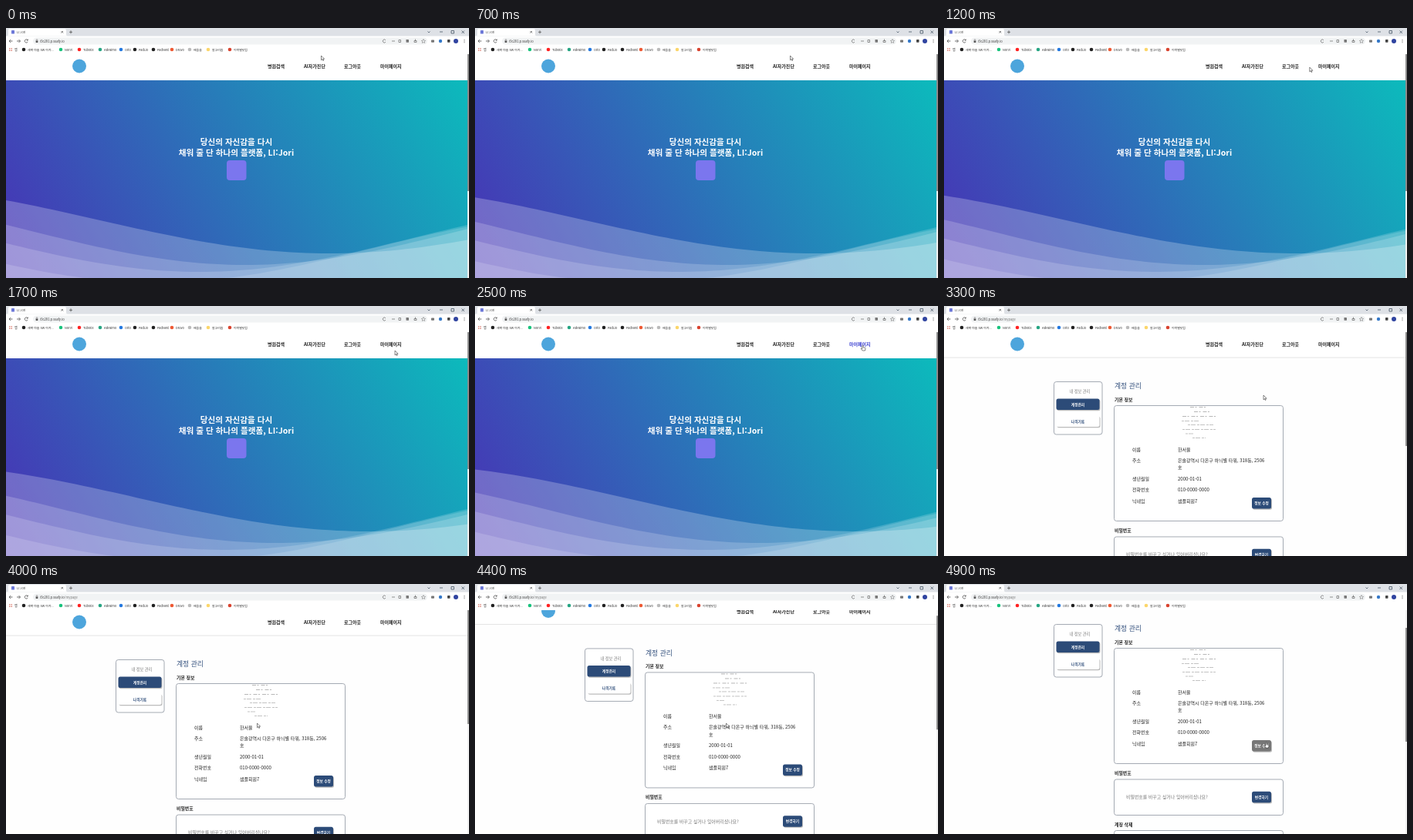
An HTML page that plays this animation: 600x325 px, repeating every 5 s.

```html
<!DOCTYPE html>
<html lang="ko">
<head>
<meta charset="utf-8">
<title>LI:Jori</title>
<style>
html, body { margin: 0; width: 100%; height: 100%; overflow: hidden; background: #fff; }
svg { display: block; width: 100vw; height: 100vh; }
text { font-family: "Noto Sans CJK KR", "Noto Sans CJK", "Noto Sans", sans-serif; white-space: pre; }
</style>
</head>
<body>
<svg id="stage" viewBox="0 0 600 325" preserveAspectRatio="none"></svg>
<script>
const LOOP = 5000, STEP = 100, OPEN = 2600, LOADED = 2900;
const NAVY = '#2c4b78', INK = '#222', WIDTH = 598;
const $ = id => document.getElementById(id);

// markup helpers
const text = (x, y, s, size, fill = INK, more = '') =>
  `<text x="${x}" y="${y}" font-size="${size}" fill="${fill}" ${more}>${s}</text>`;
const rect = (x, y, w, h, fill, r = 0, more = '') =>
  `<rect x="${x}" y="${y}" width="${w}" height="${h}" rx="${r}" fill="${fill}" ${more}/>`;
const dot = (x, y, r, fill) => `<circle cx="${x}" cy="${y}" r="${r}" fill="${fill}"/>`;
const line = (d, color = '#555', w = .8, more = '') =>
  `<path d="${d}" fill="none" stroke="${color}" stroke-width="${w}" ${more}/>`;
const BOLD = 'font-weight="700"', MID = 'text-anchor="middle"', TITLE = `${BOLD} ${MID}`;
const card = (x, y, w, h) => rect(x, y, w, h, '#fff', 3, 'stroke="#8d95a0" stroke-width=".8"');
const button = (x, y, w, h, label, fill = NAVY, color = '#fff', id = '') =>
  rect(x + 1, y + 1.2, w, h, '#0004', 2.5) + rect(x, y, w, h, fill, 2.5, id && `id="${id}"`) +
  text(x + w / 2, y + h / 2 + 1.8, label, 4.7, color, TITLE);

const bookmarks = [
  [23, '#222', '새벽 마을 SW 아카...'], [71, '#19c37d', 'Norvi'], [95, '#f22', 'Tubolix'],
  [122, '#27a583', 'AskNimo'], [149, '#2479e0', 'Olto'], [167, '#222', 'PadLio'],
  [191, '#222', 'PadNest'], [215, '#ee5a34', 'Druvo'], [238, '#bbb', '배움솔'],
  [262, '#fbd66b', '알고리즘'], [290, '#d9432f', '이력별닷컴']
];
const grid = [0, 1, 2];

const chrome = () =>
  rect(0, 0, 600, 34, '#fff') + rect(0, 0, 600, 10.5, '#dee1e6') +
  '<path d="M1 10.5q2 0 2-2V3q0-2 2-2h71q2 0 2 2v5.5q0 2 2 2z" fill="#fff"/>' +
  rect(7, 3, 4, 4.5, '#6d78d8', .5) + text(14, 6.9, 'LI:Jori', 3.9, '#444') +
  line('M71.5 4l2.5 2.5m0-2.5l-2.5 2.5M82 5.3h4m-2-2v4') +
  line('M534.5 4.500l1.5 1.5 1.5-1.5M548 5h4M563 3.5h3.5v3.500h-3.500z'.replace('M534.5 4.500', 'M546.5 4.5').replace('M548 5', 'M562 5').replace('M563 3.5h3.5v3.500h-3.500z', 'M577 3.5h3.5v3.5h-3.5z'), '#345', .7) +
  line('M590.5 3.5l3.5 3.5m0-3.5l-3.5 3.5', '#345', .7) +
  rect(35, 12.5, 511, 9, '#f1f3f4', 4.5) +
  line('M8.5 17H4m2-2l-2 2 2 2M14 17h4.5m-2-2l2 2-2 2') +
  line('M28 15.7a2.1 2.1 0 1 0 .2 2.2M28.3 14.5v1.6h-1.6') +
  rect(38.6, 16.4, 2.8, 2.5, '#555', .3) + line('M39.2 16.5v-1a.8 .8 0 0 1 1.6 0v1', '#555', .5) +
  text(44, 18.6, 'i9c201.p.ssafy.io<tspan id="path" fill="#777">/mypage</tspan>', 4.15, '#333') +
  line('M492 16a2 2 0 1 0 0 2M500 17h4M509 15.5h2.5v3h-2.5zM529 18.5v-2h3v2zM530.5 17v-2.5', '#666', .7) +
  rect(518.5, 15, 3.5, 3.7, '#777', .4) +
  line('M541 14.5l.8 1.7 1.8 .2-1.3 1.2 .3 1.8-1.6-.9-1.6 .9 .3-1.8-1.3-1.2 1.8-.2z', '#666', .5) +
  rect(551, 15.5, 4, 3.3, '#777', .7) + dot(563, 17, 2.2, '#3578c8') +
  rect(572, 15, 3.5, 3.7, '#444', .6) + dot(583, 17, 3, '#3044a0') +
  grid.map(i => dot(594, 15.2 + i * 1.8, .5, '#444')).join('') +
  grid.map(i => grid.map(j => dot(4.5 + i * 1.5, 26.5 + j * 1.5, .5, '#d66a5a')).join('')).join('') +
  text(11, 29.5, '앱', 4) +
  bookmarks.map(([x, c, s]) => dot(x, 28, 2.3, c) + text(x + 5, 29.5, s, 3.9, '#333')).join('');

const header = () =>
  rect(0, 34, WIDTH, 34, '#fff') + dot(95, 49.5, 9, '#4da5dc') +
  [[339, '병원검색'], [386, 'AI자가진단'], [438, '로그아웃'], [485, '마이페이지']]
    .map(([x, s], i) => text(x, 52.3, s, 6, INK, `${BOLD} id="nav${i}"`)).join('');

// depth, trough x, period, speed (px/s), opacity
const waves = [[293, 420, 1200, 30, .24], [308, 310, 1100, 23, .18], [317, 250, 1100, 20, .17], [331, 195, 1100, 22, .15]];

const home = () =>
  rect(0, 68, WIDTH, 257, 'url(#sky)') +
  waves.map((w, i) => `<path id="wave${i}" fill="#fff" opacity="${w[4]}"/>`).join('') +
  text(298.5, 152, '당신의 자신감을 다시', 10.6, '#fff', TITLE) +
  text(298.5, 165.8, '채워 줄 단 하나의 플랫폼, LI:Jori', 10.6, '#fff', TITLE) +
  rect(286, 172, 25.5, 26, '#7b76ee', 4);

const fields = [
  ['이름', '한서율'], ['주소', '은솔광역시 다온구 하늬별 타워, 318동, 2506'],
  ['생년월일', '2000-01-01'], ['전화번호', '010-0000-0000'], ['닉네임', '샘플회원7']
];
// the gap makes room for the second address line
const column = (x, top, part, gap) => fields.map((f, i) =>
  text(x, top + i * 14.4 + (i > 1 ? gap : 0), f[part], 6)).join('');

const account = () =>
  line('M0 67h598', '#ddd') +
  card(142.5, 98.5, 62.5, 68.5) + text(176, 113.2, '내 정보 관리', 5.2, '#777', MID) +
  button(145.5, 120.5, 56, 14.5, '계정관리') + button(145.5, 142.5, 56, 14.5, '나의기록', '#fff', NAVY) +
  text(221, 107.3, '계정 관리', 8.8, '#33507d', 'font-weight="500"') +
  text(221, 123.6, '기본 정보', 5.9, INK, BOLD) + card(220.5, 129.5, 219, 150) +
  `<g id="empty"><path d="M330 133.5c10 0 15 6 14.5 13-.5 7-4 10-7 13.5 0 5 11 5 12 13-5 5-11 7-19.500 7s-14.500-2-19.500-7c1-8 12-8 12-13-3-3.500-6.500-6.500-7-13.500-.5-7 4.500-13 14.500-13z" fill="#a2a2a2"/>
  ${column(244, 194, 0, 0)}</g><g id="filled">` +
  line('M319 131.5h21M324 137.5h21M309 143.5h43', '#999', .7, 'stroke-dasharray="5 1.5 2 3"') +
  line('M308 149.5h22M316 154.5h33M309 160.5h43M313 166h12M322 171.5h17', '#aaa', .7, 'stroke-dasharray="3 1 6 2"') +
  column(244, 188.5, 0, 9.6) + column(303, 188.5, 1, 9.6) + text(303, 212.3, '호', 6) + '</g>' +
  `<g id="edit">${button(399, 245, 25, 14.5, '정보 수정', NAVY, '#fff', 'editFace')}</g>` +
  text(221, 293.7, '비밀번호', 5.9, INK, BOLD) + card(220.5, 300, 219, 46.5) +
  text(236, 325.3, '비밀번호를 바꾸고 싶거나 잊어버리셨나요?', 5.93, '#777') +
  button(399, 315.7, 25, 14.5, '변경하기') +
  text(221, 361, '계정 삭제', 5.9, INK, BOLD) + card(220.5, 366.5, 219, 46.5);

$('stage').innerHTML =
  `<defs><linearGradient id="sky" gradientUnits="userSpaceOnUse" x1="12" y1="378" x2="585" y2="47">
  <stop stop-color="#4a2db5"/><stop offset="1" stop-color="#0cbabc"/></linearGradient></defs>` +
  rect(0, 0, 600, 325, '#fefefe') +
  `<g id="page">${header()}<g id="home">${home()}</g><g id="account">${account()}</g></g>` +
  rect(WIDTH, 34, 2, 291, '#f1f1f1') + rect(WIDTH, 34, 2, 148, '#8b8b8b', 0, 'id="thumb"') + chrome() +
  `<g id="cursor" stroke="#222" stroke-width=".55" fill="#fff">
  <path id="arrow" d="M0 0v5.8l1.4-1.3 .9 2 .9-.4-.9-1.9h1.8z"/>
  <path id="hand" d="M-.6 .5q.6-.9 1.2 0v2.3l2.4 .6q.7 .3 .5 1.2l-.6 2.4h-3.3l-2-2.7q.1-.9 1.8 .3z"/></g>`;

// pointer stops: time, x, y
const stops = [[0, 408.5, 36], [700, 408.5, 36], [1500, 504, 58], [1700, 504, 58], [2000, 502.5, 51],
  [2800, 502.5, 51], [3800, 325.5, 181], [4400, 325.5, 181], [4800, 417.5, 206], [5000, 417.5, 206]];
const ease = (t, a, b) => {
  const p = Math.min(1, Math.max(0, (t - a) / (b - a)));
  return p * p * (3 - 2 * p);
};
const pointer = t => {
  const i = stops.findIndex(s => s[0] > t), [a, ax, ay] = stops[i - 1], [b, bx, by] = stops[i];
  const p = ease(t, a, b);
  return [ax + (bx - ax) * p, ay + (by - ay) * p];
};
const show = (id, on) => $(id).setAttribute('visibility', on ? 'inherit' : 'hidden');
const move = (id, x, y) => $(id).setAttribute('transform', `translate(${x} ${y})`);

function drawWave([depth, trough, period, speed], i, t) {
  let d = 'M0 325';
  for (let n = 0; n <= 60; n++) {
    const x = n / 60 * WIDTH;
    const angle = (x - trough - speed * t / 1000) / period * 2 * Math.PI;
    d += `L${x.toFixed(1)} ${Math.min(325, depth - 43.5 * (1 - Math.cos(angle))).toFixed(2)}`;
  }
  $('wave' + i).setAttribute('d', d + `L${WIDTH} 325z`);
}

function draw(t) {
  const opened = t >= OPEN, loaded = t >= LOADED;
  const scroll = 46 * ease(t, 4250, 4650);
  const [x, y] = pointer(t);
  const onNav = scroll < 1 && x > 483 && x < 514 && y > 45 && y < 56;
  const onEdit = opened && x > 399 && x < 424 && y + scroll > 249 && y + scroll < 264;

  show('home', !opened);
  show('account', opened);
  show('empty', opened && !loaded);
  show('filled', opened && loaded);
  show('path', opened);
  if (!opened) waves.forEach((w, i) => drawWave(w, i, t));

  move('page', 0, -scroll);
  move('edit', 0, loaded ? 4 : 0);
  move('thumb', 0, scroll / 2);
  $('thumb').setAttribute('height', opened ? 148 : 178);
  $('nav3').setAttribute('fill', onNav ? '#3a3fd0' : INK);
  $('editFace').setAttribute('fill', onEdit ? '#777' : NAVY);

  move('cursor', x, y);
  show('arrow', !onNav && !onEdit);
  show('hand', onNav || onEdit);
}

function tick() {
  draw(Math.floor(performance.now() % LOOP / STEP) * STEP);
  requestAnimationFrame(tick);
}
tick();
</script>
</body>
</html>
```
